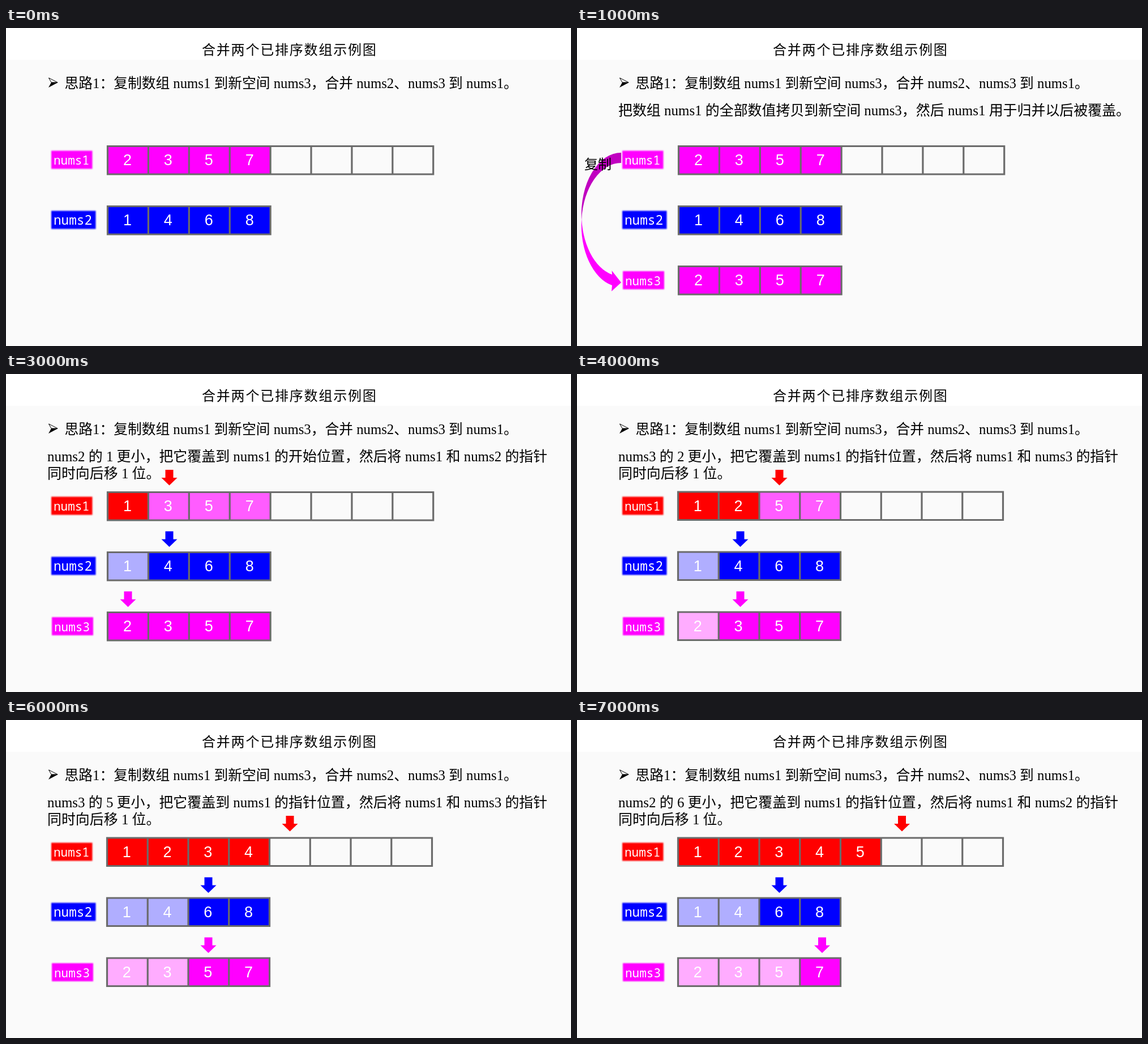
Animation of 998 by 561 pixels, one loop 8000 ms. Source, as an HTML page:

```html
<!DOCTYPE html>
<html lang="zh-CN">
<head>
<meta charset="utf-8">
<title>合并两个已排序数组示例图</title>
<style>
  html, body { margin: 0; width: 100%; height: 100%; overflow: hidden; background: #fff; }
  svg { display: block; }
  text { white-space: pre; }
  .title { font: 24px "Noto Sans CJK SC", "Noto Sans CJK", sans-serif; letter-spacing: 1.8px; }
  .body { font: 24.95px "Liberation Serif", "Noto Sans CJK SC", "Noto Sans CJK", serif; }
  .head { font-size: 24.75px; }
  .label { font-family: "Noto Sans Mono", monospace; font-weight: 500; fill: #fff; }
  .digit { font: 27px "Liberation Sans", sans-serif; fill: #fff; text-anchor: middle; }
  .soft { filter: blur(.9px); }
</style>
</head>
<body>
<svg width="998" height="561" viewBox="0 0 998 561">
  <rect width="998" height="561" fill="#fff"/>
  <rect y="56" width="998" height="505" fill="#fafafa"/>
  <text class="title" x="346" y="47">合并两个已排序数组示例图</text>
  <path d="M75.5 88L91 96H80Z" fill="#fff" stroke="#000"/>
  <path d="M75 105L92 96H80Z"/>
  <text class="body head" x="103.5" y="105.5">思路1：复制数组 nums1 到新空间 nums3，合并 nums2、nums3 到 nums1。</text>
  <g id="scene"></g>
</svg>
<script>
const STEP = 1000;
const MAGENTA = '#ff00ff', BLUE = '#0000ff', RED = '#ff0000';
const OLD = '#ff5cff', USED_MAGENTA = '#ffacff', USED_BLUE = '#b0aeff';
const A = [2, 3, 5, 7], B = [1, 4, 6, 8];
const merged = [...A, ...B].sort((a, b) => a - b);

// arrow centres above nums1 and nums2, and above nums3
const slots = [215.5, 288.5, 357.5, 429, 501.5, 574];
const slots3 = [215.5, 288.5, 357.5, 433];

const smaller = (from, value, place = '指针') => [
  `nums${from} 的 ${value} 更小，把它覆盖到 nums1 的${place}位置，然后将 nums1 和 nums${from} 的指针`,
  '同时向后移 1 位。'
];

// ptr: positions in nums1, nums2 and nums3
const steps = [
  { notes: [] },
  { notes: ['把数组 nums1 的全部数值拷贝到新空间 nums3，然后 nums1 用于归并以后被覆盖。'], copy: true },
  { notes: ['刚开始，指针都位于数组的首地址。比较 nums2 和 nums3 指针处数值的大小。'], ptr: [0, 0, 0], tight: true },
  { notes: smaller(2, 1, '开始'), ptr: [1, 1, 0] },
  { notes: smaller(3, 2), ptr: [2, 1, 1], tight: true },
  { notes: smaller(2, 4), ptr: [3, 1, 2], tight: true },
  { notes: smaller(3, 5), ptr: [4, 2, 2], tight: true },
  { notes: smaller(2, 6), ptr: [5, 2, 3], tight: true }
];

const text = (cls, x, y, s, extra = '') => `<text class="${cls}" x="${x}" y="${y}" ${extra}>${s}</text>`;

const label = (x, y, w, name, color, size) =>
  `<rect class="soft" x="${x}" y="${y}" width="${w}" height="32" fill="${color}"/>` +
  text('label', x + 4, y + 24.5, name, `font-size="${size}"`);

const arrow = (x, y, color) =>
  `<path d="M${x - 7} ${y}h14v14h7l-14 13.5l-14-13.5h7z" fill="${color}"/>`;

// cells: [value, fill] pairs
function row(y, cells, tight) {
  const x = tight ? 178.5 : 179.5, pitch = tight ? 71.75 : 71.9;
  const top = tight ? y - .5 : y, w = cells.length * pitch, h = 49.5;
  let fills = '', lines = `M${x} ${top}h${w}v${h}h${-w}z`, digits = '';
  cells.forEach(([value, fill], i) => {
    const left = x + i * pitch;
    fills += `<rect x="${left}" y="${top}" width="${pitch}" height="${h}" fill="${fill}"/>`;
    if (i) lines += `M${left} ${top}v${h}`;
    digits += text('digit', left + pitch / 2 - 1, y + 33.5, value);
  });
  return `${fills}<path d="${lines}" fill="none" stroke="#6b6b6b" stroke-width="3.2"/>${digits}`;
}

const copyArrow = `
  <path d="M78 220A70 109 0 0 0 8 338A70 109 0 0 1 78 238Z" fill="#c000c0"/>
  <path d="M8 329A70 109 0 0 0 62 435L61.5 428L78 449L61 464.5L62 454A70 109 0 0 1 8 338Z" fill="${MAGENTA}"/>` +
  text('body', 13, 249, '复制', 'style="font-size:24px"');

function draw({ notes, copy, ptr, tight }) {
  const [i, j, k] = ptr || [0, 0, 0];
  const first = Array.from({ length: 8 }, (_, n) =>
    n < i ? [merged[n], RED] : n < 4 ? [A[n], ptr ? OLD : MAGENTA] : ['', 'none']);
  const second = B.map((v, n) => [v, n < j ? USED_BLUE : BLUE]);
  const third = A.map((v, n) => [v, n < k ? USED_MAGENTA : MAGENTA]);

  let out = notes.map((s, n) => text('body', 73, 154 + n * 30, s)).join('');
  if (copy) out += copyArrow;
  out += label(80, 216.5, 72.5, 'nums1', ptr ? RED : MAGENTA, 21) + row(208.5, first, tight);
  out += label(80, 322.5, 78.5, 'nums2', BLUE, 22.7) + row(314.5, second, tight);
  if (copy || ptr) out += label(81, 429, 73, 'nums3', MAGENTA, 21) + row(420.5, third, tight);
  if (ptr) out += arrow(slots[i], 169, RED) + arrow(slots[j], 277.5, BLUE) + arrow(slots3[k], 383.5, MAGENTA);
  return out;
}

const scene = document.getElementById('scene');
const start = performance.now();
let shown = -1;

function tick() {
  const n = Math.floor((performance.now() - start) / STEP) % steps.length;
  if (n !== shown) scene.innerHTML = draw(steps[shown = n]);
  requestAnimationFrame(tick);
}
tick();
</script>
</body>
</html>
```
